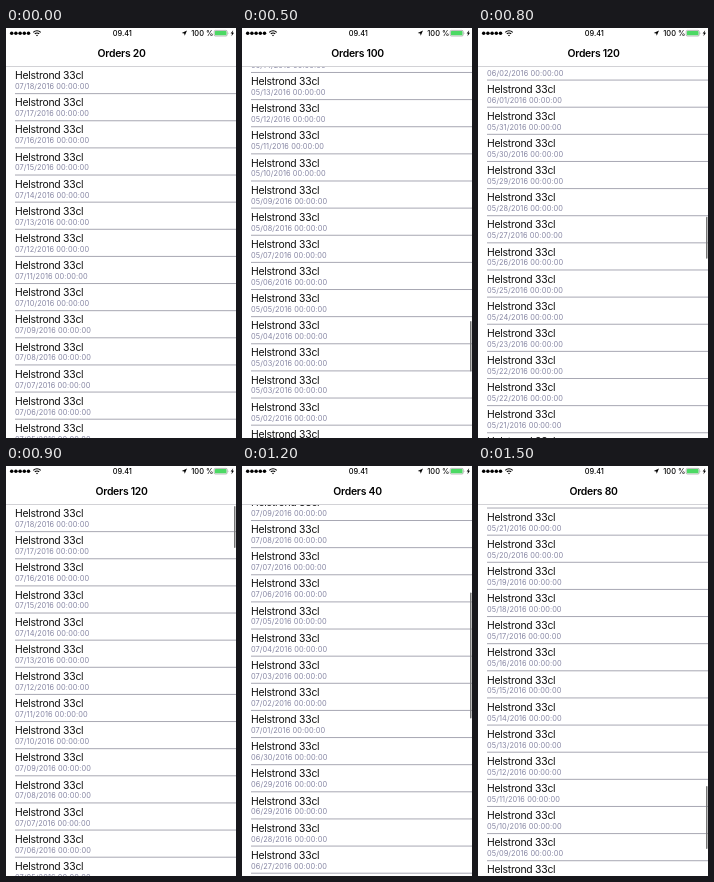
An HTML page that plays this animation: 230x410 px, repeating every 1.6 s.

```html
<!DOCTYPE html>
<html lang="en">
<head>
<meta charset="utf-8">
<title>Orders</title>
<style>
  html, body { margin: 0; width: 100%; height: 100%; overflow: hidden; background: #fff; }
  svg { display: block; width: 230px; height: 410px; font-family: Inter, Roboto, sans-serif; }
  .name { font-size: 10.4px; letter-spacing: -.25px; fill: #111; }
  .date { font-size: 7.36px; letter-spacing: .1px; fill: #8585a2; }
  .title { font-size: 10.4px; font-weight: 600; letter-spacing: -.25px; text-anchor: middle; }
  .status { font-size: 7.4px; font-weight: 500; }
</style>
</head>
<body>
<svg viewBox="0 0 230 410">
  <defs><clipPath id="view"><rect y="38.5" width="230" height="371.5"/></clipPath></defs>
  <rect width="230" height="410" fill="#fff"/>
  <g clip-path="url(#view)"><g id="list"></g></g>
  <rect y="38" width="230" height="1" fill="#d2d2d6"/>
  <rect id="bar" x="228" width="1.5" rx=".75" fill="#777"/>

  <g id="dots"></g>
  <g fill="none" stroke="#000" stroke-width="1.1">
    <path d="M27.3 4.3a5.2 5.2 0 0 1 7.4 0M28.8 5.9a3.1 3.1 0 0 1 4.4 0"/>
    <path d="M31 8.3l-1-1.1a1.5 1.5 0 0 1 2 0z" fill="#000" stroke="none"/>
  </g>
  <text class="status" x="116.3" y="7.8" text-anchor="middle">09.41</text>
  <path d="M181 2.4l-2.3 5.4-.5-2.4-2.5-.5z"/>
  <text class="status" x="185.3" y="7.8" textLength="">100 %</text>
  <rect x="208.2" y="2.4" width="13" height="5.6" rx="1.2" fill="#fff" stroke="#777" stroke-width=".5"/>
  <rect x="208.9" y="3.1" width="11.6" height="4.2" rx=".6" fill="#4cd964"/>
  <path d="M221.9 4.2q1 1 0 2z" fill="#777"/>
  <path d="M227.2 2.2l-2.6 3.4h1.5l-.7 2.6 2.6-3.5h-1.5z"/>
  <text class="title" id="title" x="115.6" y="28.6"></text>
</svg>
<script>
const ROW = 27.13, TOP = 38.5, VISIBLE = 13.7, PAGE = 20, LOOP = 1600, STEP = 100;
const NS = "http://www.w3.org/2000/svg";
const $ = id => document.getElementById(id);

function add(parent, tag, attrs, text = "") {
  const el = document.createElementNS(NS, tag);
  for (const key in attrs) el.setAttribute(key, attrs[key]);
  el.textContent = text;
  parent.appendChild(el);
  return el;
}

// The last order of each page is repeated at the top of the next one.
function orderDate(i) {
  const day = new Date(Date.UTC(2016, 6, 18 - i + Math.floor(i / PAGE)));
  const two = n => String(n).padStart(2, "0");
  return `${two(day.getUTCMonth() + 1)}/${two(day.getUTCDate())}/2016 00:00:00`;
}

for (let i = 0; i < 5; i++) add($("dots"), "circle", { cx: 5.7 + i * 4.2, cy: 5.2, r: 1.75 });

for (let i = 0; i < 6 * PAGE; i++) {
  const y = TOP + i * ROW;
  add($("list"), "text", { class: "name", x: 9, y: y + 12.7 }, "Helstrond 33cl");
  add($("list"), "text", { class: "date", x: 9, y: y + 22.6 }, orderDate(i));
  add($("list"), "rect", { x: 9, y: y + ROW - .5, width: 221, height: 1, fill: "#a8a8b3" });
}

// [time in ms, rows scrolled]
const KEYS = [[0, 0], [100, 5], [300, 36.89], [500, 68.78], [600, 83], [700, 97],
  [900, 0], [1100, 0], [1200, 9.41], [1500, 60.87]];

function scrollAt(t) {
  const k = KEYS.findIndex(key => key[0] >= t);
  if (k < 1) return 0;
  const [t0, a] = KEYS[k - 1], [t1, b] = KEYS[k];
  return a + (b - a) * (t - t0) / (t1 - t0);
}

function draw(t) {
  const rows = scrollAt(t);
  const back = t >= 700 && t < 1100;
  const total = back ? 6 * PAGE : PAGE * Math.ceil((rows + VISIBLE) / PAGE);
  const moving = t > 0 && (t < 1000 || t >= 1200);
  $("list").setAttribute("transform", `translate(0 ${-rows * ROW})`);
  $("title").textContent = "Orders " + total;
  $("bar").setAttribute("y", 40 + 368 * rows / total);
  $("bar").setAttribute("height", 368 * VISIBLE / total);
  $("bar").setAttribute("opacity", moving ? 1 : 0);
}

const start = performance.now();
function tick() {
  const t = (performance.now() - start) % LOOP;
  draw(Math.floor(t / STEP) * STEP);
  requestAnimationFrame(tick);
}
tick();
</script>
</body>
</html>
```
